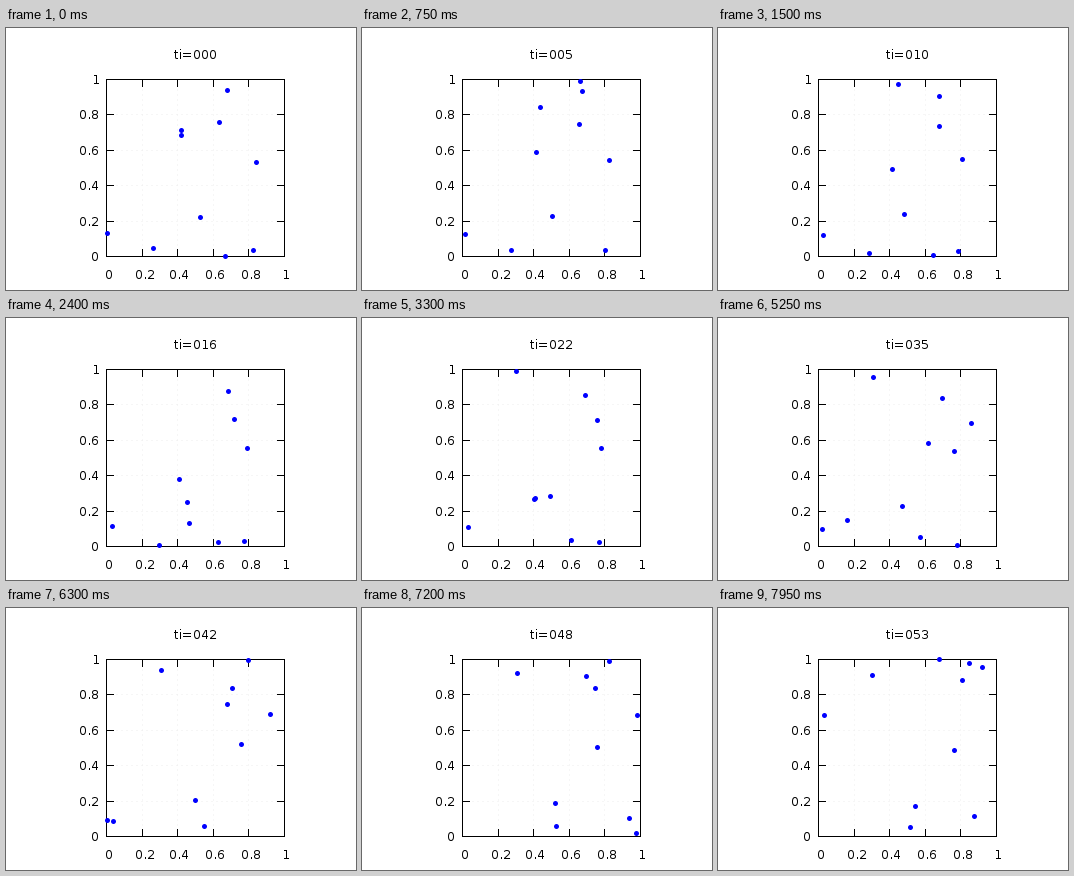
Animation of 350x262 px, one loop 8000 ms. Source, as a matplotlib script:

```python
import numpy as np
import matplotlib.pyplot as plt
from matplotlib.animation import FuncAnimation

WIDTH, HEIGHT, DPI = 350, 262, 100
LEFT, RIGHT, TOP, BOTTOM = 100, 278, 51, 228
FRAME_MS, STEP_MS, LOOP_MS = 50, 150, 8000
PX = 72 / DPI
TICK = 7

plt.rcParams.update({
    "font.family": "DejaVu Sans",
    "font.size": 40 / 3 * PX,
    "text.hinting": "native",
    "text.hinting_factor": 1,
})

# Each particle: start x, y; velocity x, y; acceleration x, y (pixels, steps).
PARTICLES = np.array([
    [101, 205, 0.52, 0.16, -0.025, 0],
    [147, 220, 0.458, 0.46, -0.0123, 0],
    [194, 189, -0.76, -0.26, -0.006, -0.006],
    [219, 227.9, -0.2, 0.36, 0, 0.016],
    [247, 222, -0.84, 0.05, 0.0346, 0.005],
    [250, 134, -0.688, -0.397, 0.016, 0.0207],
    [213, 94, 0.73, 0.483, 0.023, -0.009],
    [221, 62, -0.2, 0.27, 0, -0.037],
    [175, 102, 0.6, -4.55, -0.01, -0.01],
    [175, 107, -0.15, 3.38, 0, 0],
])
# Each collision: step, the two particles, impulse x, y on the first one.
COLLISIONS = [
    (5, 7, 3, 0.35, 1.05),
    (20, 8, 2, 1.35, 0.75),
    (22, 2, 9, 3.1, 1.8),
    (42, 9, 0, 1.4, 0.5),
    (44.5, 8, 7, 0.75, 2.75),
]


def positions(step):
    start, velocity, acceleration = np.split(PARTICLES, 3, axis=1)
    pos = start + velocity * step + acceleration * step**2 / 2
    for hit, first, second, *impulse in COLLISIONS:
        shift = max(step - hit, 0) * np.array(impulse)
        pos[first] += shift
        pos[second] -= shift
    # The box is periodic in both directions.
    corner = np.array([LEFT, TOP])
    size = np.array([RIGHT - LEFT, BOTTOM - TOP])
    return np.round(corner + (pos - corner) % size).T


fig = plt.figure(figsize=(WIDTH / DPI, HEIGHT / DPI), dpi=DPI, facecolor="white")
ax = fig.add_axes([0, 0, 1, 1])
ax.set_xlim(0, WIDTH)
ax.set_ylim(HEIGHT, 0)
ax.axis("off")


def line(x0, y0, x1, y1, **style):
    style = {"color": "black", "lw": PX, "zorder": 2, **style}
    ax.plot([x0, x1], [y0, y1], snap=True, **style)


def draw_axes():
    grid = dict(color="#eeeeee", dashes=(1, 4), dash_capstyle="butt", zorder=1)
    for k in range(6):
        x = round(LEFT + (RIGHT - LEFT) * k / 5)
        y = round(BOTTOM - (BOTTOM - TOP) * k / 5)
        label = f"{k / 5:g}"
        ax.text(x + 2.5, 251, label, ha="center", va="baseline")
        ax.text(93.5, y + 5, label, ha="right", va="baseline")
        if k in (0, 5):
            line(x, TOP, x, BOTTOM)
            line(LEFT, y, RIGHT, y)
            continue
        line(x, TOP, x, BOTTOM, **grid)
        line(LEFT, y, RIGHT, y, **grid)
        line(x, TOP, x, TOP + TICK)
        line(x, BOTTOM, x, BOTTOM - TICK)
        line(LEFT, y, LEFT + TICK, y)
        line(RIGHT, y, RIGHT - TICK, y)


draw_axes()
title = ax.text(189.3, 31, "", ha="center", va="baseline")
dots, = ax.plot([], [], "o", color="blue", ms=5 * PX, mew=0, zorder=3)


def update(frame):
    step = frame * FRAME_MS // STEP_MS
    title.set_text(f"ti={step:03d}")
    dots.set_data(*positions(step))
    return title, dots


anim = FuncAnimation(fig, update, frames=LOOP_MS // FRAME_MS,
                     interval=FRAME_MS, repeat=True, repeat_delay=0)
plt.show()
```
